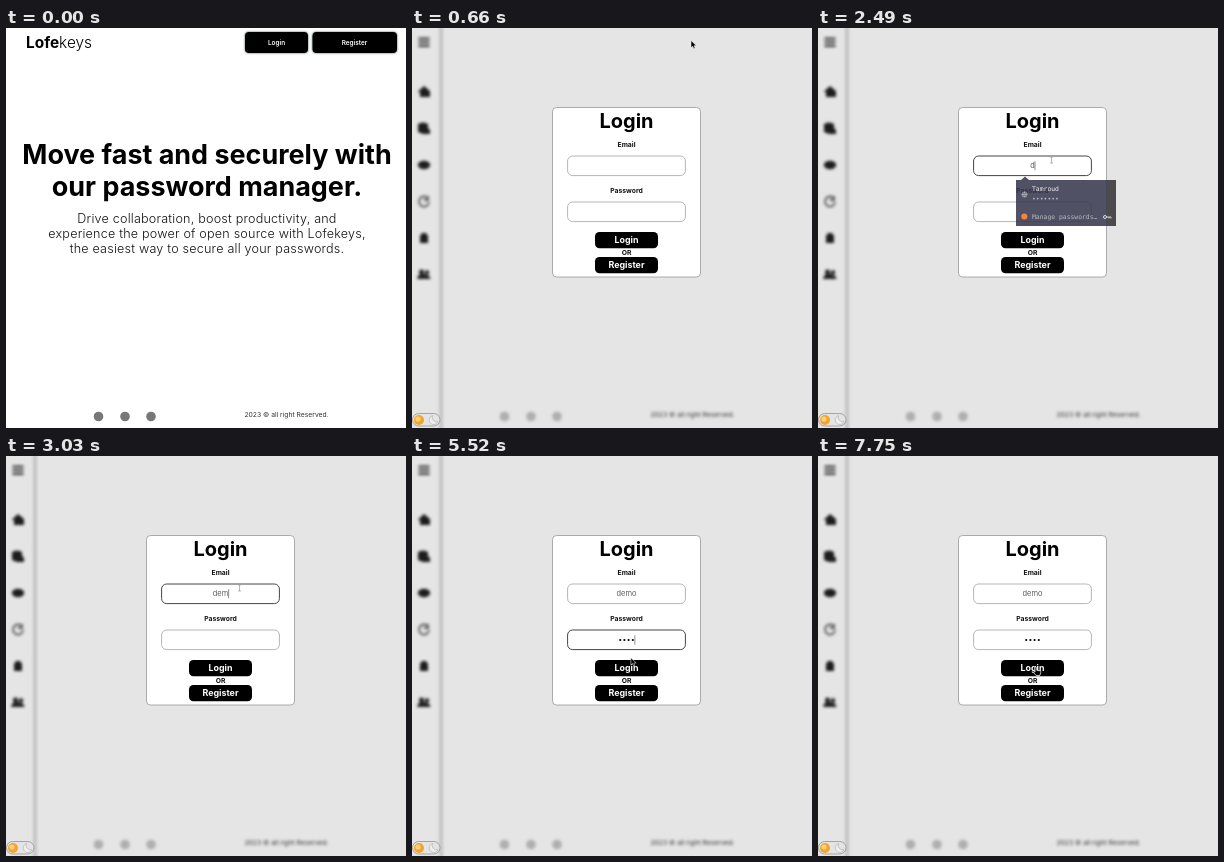
An HTML page that plays this animation: 400 px wide and 400 px high, repeating every 8 s.

```html
<!DOCTYPE html>
<html lang="en">
<head>
<meta charset="utf-8">
<title>Password manager login</title>
<style>
  html, body { margin: 0; width: 100%; height: 100%; overflow: hidden; background: #fff; }
  svg { display: block; width: 400px; height: 400px; font-family: Inter, sans-serif; }
  .mid { text-anchor: middle; }
  .bold { font-weight: 700; }
  .light { font-weight: 300; }
  .hero { font-size: 26.95px; font-weight: 700; }
  .lead { font-size: 12.6px; font-weight: 300; letter-spacing: .2px; fill: #111; }
  .nav { font-size: 6.4px; font-weight: 600; fill: #fff; }
  .label { font-size: 6.8px; font-weight: 700; fill: #111; }
  .button { font-size: 8.9px; font-weight: 700; fill: #fff; }
  .foot { font-size: 6.75px; fill: #333; }
  .value { font-size: 7.5px; font-weight: 300; fill: #333; }
  .mono { font: 6.4px "DejaVu Sans Mono", monospace; }
  .blur { filter: blur(1.5px); }
  .glow { filter: drop-shadow(0 0 1.2px #4a5c55); }
  .input { fill: #fff; stroke: #a3a3a3; stroke-width: .8; }
  .input.focus { stroke: #444; stroke-width: 1; }
  .caret { stroke: #444; stroke-width: .6; }
</style>
</head>
<body>
<svg viewBox="0 0 400 400">
  <defs>
    <g id="marks"><circle cx="92.5" cy="388.5" r="4.8"/><circle cx="119" cy="388.5" r="4.8"/><circle cx="145" cy="388.5" r="4.8"/></g>
    <text id="rights" class="foot" x="238.5" y="389">2023 © all right Reserved.</text>
  </defs>

  <g id="home">
    <rect width="400" height="400" fill="#fff"/>
    <text x="20" y="20.3" font-size="15.4"><tspan class="bold">Lofe</tspan><tspan class="light">keys</tspan></text>
    <g class="glow"><rect x="239" y="4" width="63" height="21" rx="4"/><rect x="306.5" y="4" width="84.5" height="21" rx="4"/></g>
    <text class="nav mid" x="270.5" y="17">Login</text>
    <text class="nav mid" x="348.5" y="17">Register</text>
    <text class="hero mid" x="201" y="135.9">Move fast and securely with</text>
    <text class="hero mid" x="201" y="168">our password manager.</text>
    <g class="lead mid">
      <text x="201" y="194.5">Drive collaboration, boost productivity, and</text>
      <text x="201" y="209.8">experience the power of open source with Lofekeys,</text>
      <text x="201" y="225">the easiest way to secure all your passwords.</text>
    </g>
    <use href="#marks" fill="#777"/>
    <use href="#rights"/>
  </g>

  <g id="page">
    <rect width="400" height="400" fill="#e5e5e5"/>
    <rect class="blur" x="27.5" y="-5" width="3" height="410" fill="#bbb"/>
    <g class="blur" fill="#1c1c1c">
      <path d="M6.5 10.5h11m-11 3.7h11m-11 3.7h11" stroke="#333" stroke-width="2"/>
      <path d="M5.5 64l6.5-6 6 5v6h-10v-5z"/>
      <path d="M6 96q5-3 10 0v4l2 2v4h-7l-5-2z"/>
      <ellipse cx="12" cy="137" rx="6.2" ry="4.2"/>
      <path d="M17 174a5 5 0 1 1-2-4.5M16 168v4h-4" fill="none" stroke="#555" stroke-width="1.8"/>
      <path d="M8 207h8v8h-8zM9.5 205h5v2h-5z"/>
      <circle cx="9.5" cy="244" r="2.5"/><circle cx="15" cy="244.5" r="2.2"/>
      <path d="M5 251q1-5 5-5t4 1q4 0 4.5 4z"/>
    </g>
    <rect x=".5" y="385.5" width="27.5" height="12.5" rx="6.2" fill="#e4e4e4" stroke="#888" stroke-width=".7"/>
    <circle cx="7" cy="392" r="5" fill="#f3a42c"/><circle cx="6" cy="391" r="2.6" fill="#fbd27a"/>
    <path d="M20.5 387.5a4.6 4.6 0 1 0 5.5 6.2 4.6 4.6 0 0 1-5.5-6.2z" fill="#eee" stroke="#aaa" stroke-width=".6"/>
    <g id="softMarks"><use class="blur" href="#marks" fill="#aeaeae"/></g>
    <use class="blur" href="#rights"/>

    <rect x="140.5" y="79.5" width="148" height="169.5" rx="4" fill="#fff" stroke="#999" stroke-width=".8"/>
    <text class="mid bold" x="214.5" y="99.9" font-size="20">Login</text>
    <text class="label mid" x="214.5" y="118.5">Email</text>
    <rect id="email" class="input" x="155.6" y="128" width="117.8" height="19.6" rx="5"/>
    <text id="emailText" class="value mid" x="214.5" y="140.4"></text>
    <text class="label mid" x="214.5" y="164.5">Password</text>
    <rect id="pass" class="input" x="155.6" y="174" width="117.8" height="19.6" rx="5"/>
    <g id="dots"></g>
    <path id="caret" class="caret" d="M0 -4.5v9"/>
    <rect x="183" y="204" width="63" height="16.3" rx="4.5"/>
    <rect x="183" y="229" width="63" height="16.3" rx="4.5"/>
    <text class="button mid" x="214.5" y="215.2">Login</text>
    <text class="label mid" x="214.5" y="227.3">OR</text>
    <text class="button mid" x="214.5" y="240.3">Register</text>

    <g id="popup">
      <path d="M198 152h5l4-3.5 4 3.5h78v46h-91z" fill="#38384f" fill-opacity=".87"/>
      <path d="M289 152h9v46h-9z" fill="#4c4a4a"/>
      <g fill="none" stroke="#c8c8d0" stroke-width=".6"><circle cx="206.5" cy="166.5" r="2.6"/><path d="M204 166.5h5M206.5 164q-2 2.5 0 5 2-2.5 0-5"/></g>
      <text class="mono" x="214" y="163" fill="#f0f0f2">Tamroud</text>
      <text class="mono" x="214" y="172.5" fill="#b4b4c4">•••••••</text>
      <circle cx="206.3" cy="188.5" r="3" fill="#f0883a"/>
      <text class="mono" x="214" y="191" fill="#b8b8c0">Manage passwords…</text>
      <g fill="none" stroke="#ddd"><circle cx="287" cy="189" r="1.5"/><path d="M288.5 189h4.5v1.5m-2-1.5v1.5" stroke-width=".9"/></g>
    </g>
  </g>

  <g id="arrow"><path d="M0 0v7.2l1.7-1.5 1.1 2.5 1.3-.6-1.1-2.4h2.4z" stroke="#fff" stroke-width=".5"/></g>
  <g id="beam"><path d="M-1.5-3h3M0-3v6M-1.5 3h3" fill="none" stroke="#999" stroke-width=".7"/></g>
  <g id="hand"><path d="M0 1q.9-1.5 1.7 0v2.7l3.5.7q.8.4.5 1.7l-.9 2.9h-3.7l-2.7-3.2q.2-1.2 1.6-.3z" stroke="#eee" stroke-width=".8"/></g>
</svg>
<script>
  const $ = id => document.getElementById(id);
  const show = (id, on) => $(id).style.display = on ? '' : 'none';
  const place = (id, x, y) => $(id).setAttribute('transform', `translate(${x} ${y})`);
  const mix = (a, b, k) => a + (b - a) * k;
  // Progress from 0 to 1 in n equal jumps, the first at a and the last at b.
  const steps = (t, a, b, n) =>
    Math.max(0, Math.min(n, Math.floor((t - a) * (n - 1) / (b - a) + 1e-6) + 1)) / n;
  const count = (t, times) => times.filter(at => t >= at).length;

  function drawPointer(t) {
    let kind = 'hand', x, y;
    if (t < 550) {
      const k = steps(t, 50, 250, 5);
      x = mix(381, 276, k);
      y = mix(5, 10, k);
      if (t < 50) kind = '';
    } else if (t < 5160) {
      const k = steps(t, 1030, 1300, 6);
      x = mix(279, 233.5, k);
      y = mix(12.5, 132, k);
      kind = k < 1 ? 'arrow' : 'beam';
    } else {
      const k = steps(t, 5160, 5570, 9);
      x = mix(233.5, 217, k);
      y = mix(132, 210.5, k);
      const inField = y < 148 || y > 174 && y < 194;
      kind = inField ? 'beam' : y < 204 ? 'arrow' : 'hand';
    }
    for (const id of ['arrow', 'beam', 'hand']) show(id, id === kind);
    if (kind) place(kind, x, y);
  }

  function drawForm(t) {
    const onEmail = t >= 1570 && t < 3800;
    const onPass = t >= 3800 && t < 5720;
    $('email').classList.toggle('focus', onEmail);
    $('pass').classList.toggle('focus', onPass);

    const typed = count(t, [2490, 2700, 3030, 3470]);
    $('emailText').textContent = 'demo'.slice(0, typed);
    const hidden = count(t, [4230, 4390, 4470, 4550]);
    $('dots').innerHTML = Array.from({ length: hidden }, (_, i) =>
      `<circle cx="${214.5 + (i - (hidden - 1) / 2) * 4.2}" cy="184" r="1.1"/>`).join('');

    show('caret', onEmail && (t < 2270 || t >= 2490) || onPass);
    if (onPass) place('caret', 214.5 + hidden * 2.1, 184);
    else place('caret', [214.5, 217, 219.3, 222.6, 225][typed], 137.7);

    const fade = t < 2490 ? 0 : steps(t, 2545, 2700, 4);
    $('popup').style.opacity = t < 1570 ? 0 : (t < 1630 ? .6 : 1) * (1 - fade);
  }

  function draw(t) {
    $('page').style.opacity = steps(t, 550, 660, 3);
    $('softMarks').style.opacity = t < 6470 ? 1 : [0, .5, .85, 1][count(t, [6890, 7140, 7750])];
    drawForm(t);
    drawPointer(t);
  }

  const start = performance.now();
  function tick() {
    draw((performance.now() - start) % 8000);
    requestAnimationFrame(tick);
  }
  tick();
</script>
</body>
</html>
```
